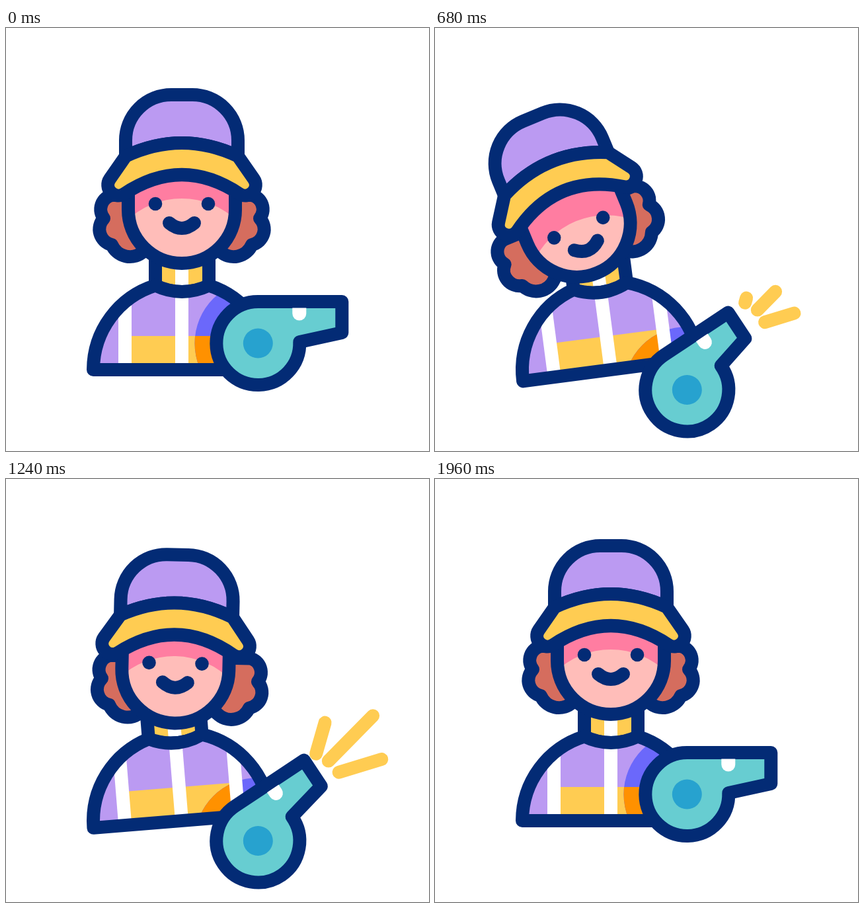
An HTML page with a canvas for the animation above (2000 ms loop, 640 px wide and 640 px high).

```html
<!DOCTYPE html>
<html lang="en">
<head>
<meta charset="utf-8">
<title>Coach with whistle</title>
<style>
html, body { margin: 0; width: 100%; height: 100%; overflow: hidden; background: #fff; }
canvas { display: block; width: 640px; height: 640px; }
</style>
</head>
<body>
<canvas id="stage"></canvas>
<script>
const LOOP = 2000;
const NAVY = '#032b75', LILAC = '#bb9af2', YELLOW = '#ffcc52', WHITE = '#fff';
const VIOLET = '#6b68fb', ORANGE = '#ff9100', BROWN = '#d56d5e';
const SKIN = '#ffbdb9', PINK = '#ff7da1', TEAL = '#67cdd1', BLUE = '#27a2cf';

const canvas = document.getElementById('stage');
const ctx = canvas.getContext('2d');
const dpr = window.devicePixelRatio || 1;
canvas.width = canvas.height = 640 * dpr;

const clamp = (x, lo, hi) => Math.min(hi, Math.max(lo, x));
const ease = x => {
  x = clamp(x, 0, 1);
  return x * x * (3 - 2 * x);
};

// Rest, low, high, low, rest, in four even steps
function swing(t, start, step, low, high) {
  const e = k => ease((t - start) / step - k);
  return low * (e(0) - e(3)) + (high - low) * (e(1) - e(2));
}

// Rises from 0 to 1, then falls back
const hold = (t, up, down, time) => ease((t - up) / time) - ease((t - down) / time);

const bodyTilt = t => swing(t, 203, 392, -9.6, 7.8);
const headTilt = t => swing(t, 245, 402, -23.4, 22.8);
const faceNod = t => swing(t, 255, 412, 16, -9.5);
const headDrop = t => hold(t, 270, 1450, 420);
const lift = t => hold(t, 190, 1488, 415);

// The mouthpiece shortens three times, once per breath
const BREATH = 480;
const pipe = t => 127 - 20 * Math.sin(Math.PI * clamp((t - 325) / BREATH, 0, 3)) ** 2;

const BODY = new Path2D('M132 517 A134 134 0 0 1 226 389.5 Q266 408.5 307 389.5 A134 134 0 0 1 400 517 Z');
const NECK = new Path2D('M226 391 V335 H307 V391 Q266 407 226 391 Z');
const HAIR = new Path2D('M160 253 A22 22 0 0 0 148 288 A24 24 0 0 0 160 328 A30 30 0 0 0 208 338 L230 320 V253 Z');
const FACE = new Path2D('M185 215 V275 A81 81 0 0 0 347 275 V215 Z');
const BLUSH = new Path2D('M145 379 A121 121 0 0 1 387 379 V160 H145 Z');
const SMILE = new Path2D('M247 295 Q266 311 285 295');
const CROWN = new Path2D('M181 194 V170 A69 69 0 0 1 250 101 H282 A69 69 0 0 1 351 170 V194 Q266 154 181 194 Z');
const BRIM = new Path2D('M181 194 Q266 154 351 194 L375 228.5 A16 16 0 0 1 354 251.5 ' +
  'Q266 192.5 178 251.5 A16 16 0 0 1 157 228.5 Z');

function fill(path, color) {
  ctx.fillStyle = color;
  ctx.fill(path);
}

function outline(path, color = NAVY) {
  ctx.strokeStyle = color;
  ctx.stroke(path);
}

function shape(path, color) {
  fill(path, color);
  outline(path);
}

function rect(x, y, w, h, color) {
  ctx.fillStyle = color;
  ctx.fillRect(x, y, w, h);
}

function circle(x, y, r) {
  const path = new Path2D();
  path.arc(x, y, r, 0, 2 * Math.PI);
  return path;
}

function group(draw) {
  ctx.save();
  draw();
  ctx.restore();
}

function turn(deg, x, y) {
  ctx.translate(x, y);
  ctx.rotate(deg * Math.PI / 180);
  ctx.translate(-x, -y);
}

function drawFabric(top, band) {
  rect(100, 370, 340, 160, top);
  rect(180, 466, 172, 60, band);
}

function drawTorso(t, whistleY) {
  const tilt = bodyTilt(t);
  fill(NECK, YELLOW);
  rect(256, 335, 20, 70, WHITE);
  outline(NECK);
  group(() => {
    ctx.clip(BODY);
    drawFabric(LILAC, YELLOW);
    // The whistle's shadow does not lean with the torso
    group(() => {
      turn(-tilt, 266, 517);
      ctx.clip(circle(381, whistleY, 95.5));
      turn(tilt, 266, 517);
      drawFabric(VIOLET, ORANGE);
    });
    for (let x = 170; x < 350; x += 86) rect(x, 370, 20, 160, WHITE);
  });
  outline(BODY);
}

function drawHead(t) {
  const drop = headDrop(t), nod = faceNod(t), tilt = headTilt(t);
  // Hair hangs to the low side and lags behind the turn
  const sway = 0.24 * tilt - (tilt - headTilt(t - 40));
  ctx.translate(0, 13 * drop);
  turn(tilt - bodyTilt(t), 266, 361);

  for (const side of [1, -1]) {
    group(() => {
      ctx.translate(266 + sway, 2.5 * drop);
      ctx.scale(side, 1);
      ctx.translate(-266, 0);
      shape(HAIR, BROWN);
    });
  }

  fill(FACE, SKIN);
  group(() => {
    ctx.clip(FACE);
    ctx.translate(0, nod - 2.6 * drop);
    fill(BLUSH, PINK);
  });
  outline(FACE);
  group(() => {
    ctx.translate(0, nod);
    for (const side of [-1, 1]) fill(circle(266 + 40 * side, 266, 10.3), NAVY);
    outline(SMILE);
  });
  shape(CROWN, LILAC);
  shape(BRIM, YELLOW);
}

function drawWhistle(t, y) {
  ctx.translate(381.3, y);
  ctx.rotate(-33.6 * lift(t) * Math.PI / 180);
  shape(new Path2D(`M0 -63 H${pipe(t)} V-16 L63 -2 A63 63 0 1 1 0 -63 Z`), TEAL);
  fill(circle(0, 0, 22.5), BLUE);
  fill(new Path2D('M52 -53.5 H73 V-45 A10.5 10.5 0 0 1 52 -45 Z'), WHITE);
}

// Three rays fan out from the mouthpiece one after another
function drawRays(t) {
  for (const blow of [555, 1045]) {
    [118, 166, 144].forEach((reach, i) => {
      const p = t - blow - 45 * i;
      const head = ease(p / 215), tail = ease((p - 165) / 200);
      if (head <= tail) return;
      const angle = (17 + 28.5 * i) * Math.PI / 180;
      const at = k => {
        const r = 44 + (reach - 44) * k;
        return `${457 + r * Math.cos(angle)} ${458 - r * Math.sin(angle)}`;
      };
      outline(new Path2D(`M${at(tail)} L${at(head)}`), YELLOW);
    });
  }
}

function draw(t) {
  const whistleY = 477 + 70.5 * lift(t);
  ctx.setTransform(dpr, 0, 0, dpr, 0, 0);
  rect(0, 0, 640, 640, WHITE);
  ctx.lineWidth = 20;
  ctx.lineCap = ctx.lineJoin = 'round';
  group(() => {
    turn(bodyTilt(t), 266, 517);
    drawTorso(t, whistleY);
    drawHead(t);
  });
  drawRays(t);
  group(() => drawWhistle(t, whistleY));
}

const start = performance.now();
function tick() {
  draw((performance.now() - start) % LOOP);
  requestAnimationFrame(tick);
}
tick();
</script>
</body>
</html>
```
